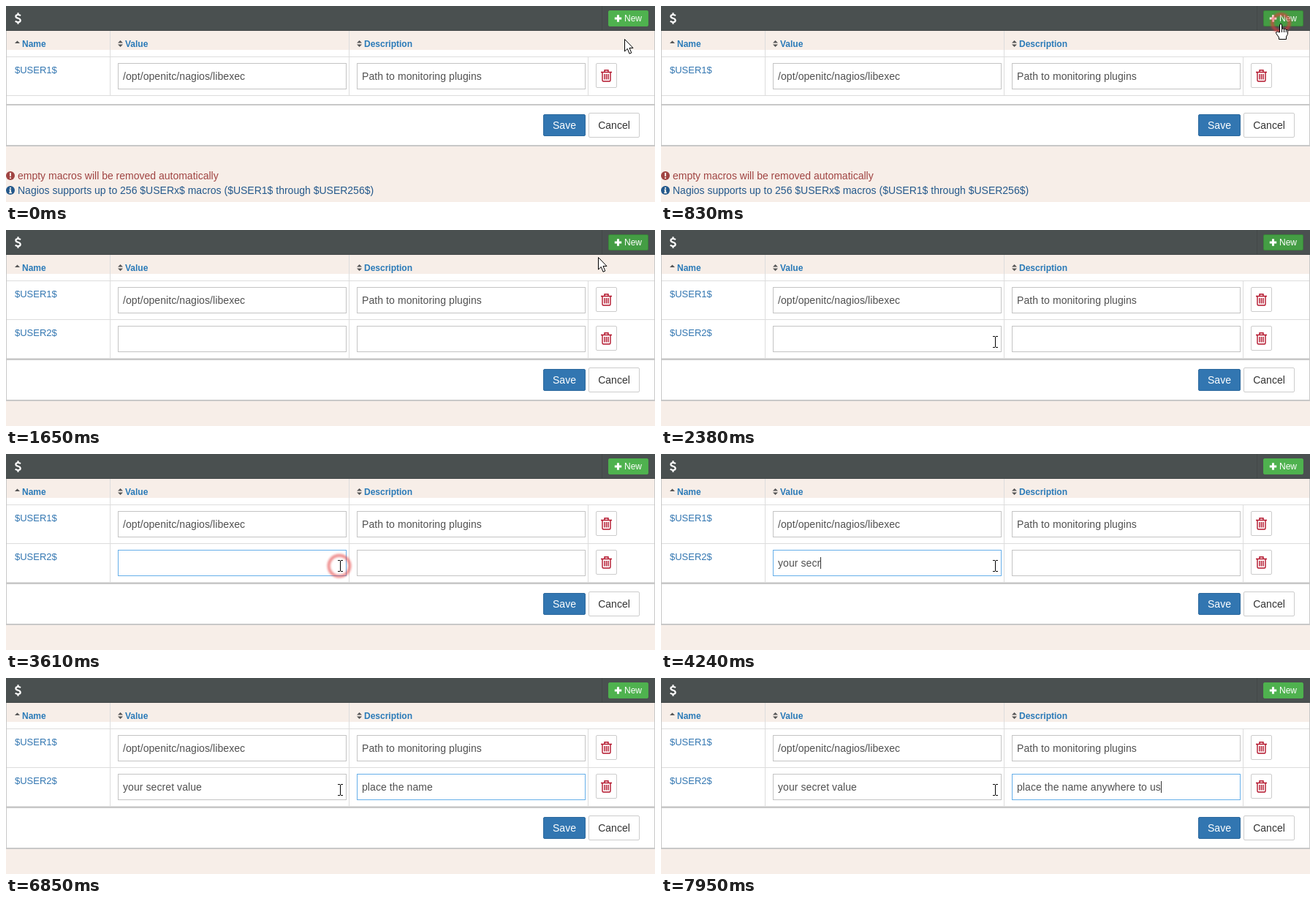
An HTML page that plays this animation: 888 px wide and 268 px high, repeating every 8 s.

```html
<!DOCTYPE html>
<html lang="en">
<head>
<meta charset="utf-8">
<title>User macros</title>
<style>
  html, body { margin: 0; width: 100%; height: 100%; overflow: hidden; }
  body { position: relative; background: #f7eee8; font: 14px/20px "Liberation Sans", Arial, sans-serif; color: #505050; }
  div, span, svg { position: absolute; box-sizing: border-box; white-space: pre; }
  svg { overflow: visible; }

  .panel { left: 0; top: 34px; width: 888px; height: 144px; background: #fff; border: solid #c8c8c8; border-width: 0 1px; }
  .bar { left: 0; top: 0; width: 888px; height: 34px; background: #4a5050; border-bottom: 1px solid #424747; }
  .bar svg { left: 12px; top: 9px; fill: none; stroke: #fff; stroke-width: 2.2; }
  .bar i { position: absolute; left: 815px; top: 0; width: 1px; height: 33px; background: #434848; }
  .new { left: 824px; top: 6px; width: 55px; height: 22px; border: 1px solid #4cae4c; border-radius: 2px;
         background: #4fb24f; color: #fff; font-size: 12px; }
  .new.on { background: #449d44; border-color: #398439; }
  .new span { left: 21px; top: 0; }

  .head { left: 1px; top: 34px; width: 886px; height: 36px; border-bottom: 1px solid #ddd;
          background: linear-gradient(#f7eee8 26px, #fff 26px); }
  .head span { top: 8px; font-size: 12px; font-weight: bold; color: #2a7ab8; }
  .head svg { top: 13px; fill: #555; }
  .line { width: 1px; background: #ddd; }

  .row { left: 1px; width: 886px; height: 53px; border-bottom: 1px solid #ddd; background: #fff; }
  .row .name { left: 11px; top: 8px; font-size: 13px; color: #3276b1; }
  .row .line { top: 0; height: 52px; }
  .field { top: 8px; width: 313px; height: 36px; border: 1px solid #c4c4c4; padding: 7px 6px; letter-spacing: .08px; }
  .field.value { left: 152px; }
  .field.note { left: 479px; }
  .caret { width: 1px; height: 16px; margin-top: 2px; background: #333; }
  .trash { left: 806px; top: 8px; width: 29px; height: 34px; border: 1px solid #ccc; border-radius: 2px; }
  .trash svg { left: 6px; top: 8px; fill: none; stroke: #b3142b; stroke-width: 1.4; }

  .foot { left: 0; top: 134px; width: 888px; height: 58px; background: #fff; border: 1px solid #c8c8c8; border-width: 2px 1px; }
  .btn { border-radius: 2px; text-align: center; border: 1px solid #ccc; color: #333; background: #fff; }
  .save { left: 734px; top: 12px; width: 58px; height: 30px; line-height: 28px; color: #fff; background: #3276b1; border-color: #2c699d; }
  .cancel { left: 796px; top: 10px; width: 70px; height: 34px; line-height: 32px; }
  .tip { left: 16px; }
  .tip svg { left: -16px; top: 4px; stroke: #f7eee8; stroke-width: 2; }
  .bad { top: 222px; color: #a04442; fill: #a04442; }
  .info { top: 242px; color: #24598c; fill: #24598c; }
</style>
</head>
<body>
<svg width="0" height="0">
  <symbol id="up" overflow="visible"><path d="M0 4 3.5 .5 7 4Z"/></symbol>
  <symbol id="sort" overflow="visible"><path d="M0 3.5 3.5 0 7 3.5ZM0 5.5 3.5 9 7 5.5Z"/></symbol>
  <symbol id="bin" overflow="visible"><path d="M0 3.5H15M5 3V.8H10V3M2 3.5V14.5Q2 16 3.5 16H11.5Q13 16 13 14.5V3.5M5 6V13.5M7.5 6V13.5M10 6V13.5"/></symbol>
</svg>

<div class="panel"></div>
<div class="bar">
  <svg width="9" height="16"><path d="M8 4.2Q6.4 3 4.5 3 1.4 3 1.4 5.2 1.4 6.9 4.5 7.8 7.7 8.8 7.7 10.7 7.7 13 4.5 13 2.3 13 .8 11.4M4.5 .3V3M4.5 13V15.8"/></svg>
  <i></i>
</div>
<div class="new" id="add">
  <svg style="left:8px;top:5px" width="10" height="10"><path d="M4.5 .3V9.7M-.2 5H9.2" stroke="#fff" stroke-width="3"/></svg>
  <span>New</span>
</div>

<div class="head">
  <svg style="left:11px" width="8" height="9"><use href="#up"/></svg><span style="left:21px">Name</span>
  <svg style="left:152px" width="8" height="9"><use href="#sort"/></svg><span style="left:162px">Value</span>
  <svg style="left:479px" width="8" height="9"><use href="#sort"/></svg><span style="left:489px">Description</span>
  <div class="line" style="left:141px;top:0;height:35px"></div>
  <div class="line" style="left:468px;top:0;height:35px"></div>
</div>

<div id="lower">
  <div class="foot">
    <div class="btn save">Save</div>
    <div class="btn cancel">Cancel</div>
  </div>
  <div class="tip bad"><svg width="12" height="12"><circle cx="6" cy="6" r="6" stroke="none"/><path d="M6 2V7M6 8.2V10"/></svg>empty macros will be removed automatically</div>
  <div class="tip info"><svg width="12" height="12"><circle cx="6" cy="6" r="6" stroke="none"/><path d="M6 2V3.8M4.5 5.5H6V9M4.3 9.3H7.8"/></svg>Nagios supports up to 256 $USERx$ macros ($USER1$ through $USER256$)</div>
</div>
<div id="rows"></div>

<svg id="ring" width="1" height="1" fill="none" stroke="#e23c3c">
  <filter id="soft" x="-50%" y="-50%" width="200%" height="200%"><feGaussianBlur stdDeviation="1"/></filter>
  <g filter="url(#soft)">
    <circle stroke-width="6" opacity=".4"/>
    <circle stroke-width="3" opacity=".8"/>
  </g>
</svg>
<svg id="arrow" width="1" height="1"><path d="M.5 .5V17L4.3 13.4 7 20.2 9.8 19 7 12.4H12Z" fill="#fff" stroke="#000"/></svg>
<svg id="hand" width="1" height="1"><path d="M-1.5 12V2Q-1.5 .5 0 .5T1.5 2V7.5Q3 6 4.5 7.8 6 6.6 7.3 8.5 9.5 7.8 9.5 10V14.5L7.5 18V21.5H-2.5V19L-6.3 13.5Q-7 11 -4.5 11Z" fill="#fff" stroke="#000"/><path d="M1.5 7.5V12M4.5 8V12M7.3 8.5V12" stroke="#000"/></svg>
<svg id="beam" width="1" height="1"><path d="M-3 -7.5H0M1 -7.5H4M.5 -7V7M-3 7.5H0M1 7.5H4" fill="none" stroke="#000"/></svg>

<script>
const $ = id => document.getElementById(id);
const row = (n, top, value, note) => `
  <div class="row" id="row${n}" style="top:${top}px">
    <span class="name">$USER${n}$</span>
    ${[141, 468, 795].map(x => `<div class="line" style="left:${x}px"></div>`).join('')}
    <div class="field value" id="value${n}">${value}</div>
    <div class="field note" id="note${n}">${note}</div>
    <div class="trash"><svg width="15" height="16"><use href="#bin"/></svg></div>
  </div>`;
$('rows').innerHTML =
  row(1, 70, '/opt/openitc/nagios/libexec', 'Path to monitoring plugins') + row(2, 123, '', '');

const LOOP = 8000, ADDED = 1500;
const clamp = v => Math.max(0, Math.min(1, v));
const part = (t, a, b) => clamp((t - a) / (b - a));
const mix = (a, b, p) => a + (b - a) * p;
const ease = p => p * p * (3 - 2 * p);
const within = (t, a, b) => t >= a && t < b;

// Bursts of typing: text, first key, last key
const VALUE = [['your sec', 3720, 4140], ['ret value', 4240, 4700]];
const NOTE = [['place the ', 5370, 6170], ['na', 6230, 6330], ['me ', 6490, 6690],
              ['anywhere ', 6880, 7510], ['to us', 7726, 7950]];
const typed = (bursts, t) => bursts.map(([s, a, b]) =>
  t < a ? '' : s.slice(0, 1 + Math.floor((t - a + .01) / (b - a) * (s.length - 1)))).join('');

function pointer(t) {
  const a = ease(part(t, 30, 390)), b = ease(part(t, ADDED, 2280));
  return [mix(mix(846, 848, a), 457, b), mix(mix(45, 24, a), 153, b)];
}

function shape(x, y, rows) {
  if (within(x, 824, 879) && within(y, 6, 28)) return 'hand';
  const inCol = within(x, 153, 466) || within(x, 480, 793);
  const inRow = within(y, 78, 114) || (rows > 1 && within(y, 131, 167));
  return inCol && inRow ? 'beam' : 'arrow';
}

function fill(id, text, caret, focus) {
  const html = text + (caret ? '<span class="caret"></span>' : '');
  const el = $(id);
  if (el.dataset.html !== html) el.innerHTML = el.dataset.html = html;
  const c = [102, 175, 233].map(v => Math.round(mix(196, v, focus)));
  el.style.borderColor = `rgb(${c})`;
}

function drawRing(t) {
  const first = t < 2000;
  const p = (t - (first ? 650 : 3340)) / 720;
  const q = clamp(p);
  const [x, y] = first ? [848, 23] : [456, 152.5];
  const ring = $('ring');
  ring.style.display = p >= 0 && p < 1 ? '' : 'none';
  ring.style.left = x + 'px';
  ring.style.top = y + 'px';
  ring.style.opacity = 1 - q;
  ring.querySelectorAll('circle').forEach(c => c.setAttribute('r', 3 + 15 * (1 - (1 - q) ** 3)));
}

function render(t) {
  const added = t >= ADDED;
  $('row2').style.display = added ? '' : 'none';
  $('lower').style.top = added ? '42px' : '0';

  const [x, y] = pointer(t), kind = shape(x, y, added ? 2 : 1);
  for (const id of ['arrow', 'hand', 'beam']) {
    const s = $(id).style;
    s.display = id === kind ? '' : 'none';
    s.left = Math.round(x) + 'px';
    s.top = Math.round(y) + 'px';
  }
  $('add').classList.toggle('on', kind === 'hand' || within(t, 650, 2510));
  drawRing(t);

  const tab = t < 4860 ? 0 : t < 4890 ? .5 : 1;
  fill('value2', typed(VALUE, t), within(t, 2480, 3040) || within(t, 3720, 4860),
       part(t, 2480, 2610) * (1 - tab));
  fill('note2', typed(NOTE, t),
       t >= 4890 && !within(t, 5050, 5210) && !within(t, 6850, 6880) && !within(t, 7670, 7726), tab);
}

const begin = performance.now();
function tick() {
  render((performance.now() - begin) % LOOP);
  requestAnimationFrame(tick);
}
render(0);
requestAnimationFrame(tick);
</script>
</body>
</html>
```
